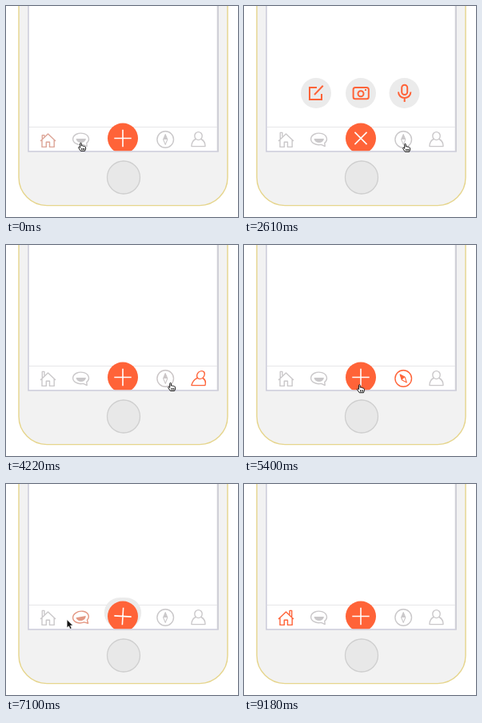
An HTML page for the animation above (9.89 s loop, 290 px wide and 264 px high).

```html
<!DOCTYPE html>
<html lang="en">
<head>
<meta charset="utf-8">
<title>Tab bar</title>
<style>
  html, body { margin: 0; width: 100%; height: 100%; overflow: hidden; background: #fff; }
  svg { display: block; width: 290px; height: 264px; }
  .icon { fill: none; stroke-width: 1.4; stroke-linejoin: round; }
  .menu .disc { fill: #ebebeb; }
  .menu .art { fill: none; stroke: #ff6338; stroke-width: 2; }
  .solid { stroke: none; fill: currentColor; }
</style>
</head>
<body>
<svg viewBox="0 0 290 264">
  <defs>
    <clipPath id="screen"><rect x="28" y="0" width="237" height="181.3"/></clipPath>
  </defs>

  <rect x="16" y="-60" width="261" height="309.6" rx="35" fill="#f2f2f2" stroke="#e6d58c" stroke-width="1.4"/>
  <rect x="28" y="-10" width="237" height="192" fill="#fff" stroke="#cbcbda" stroke-width="1.5"/>
  <path d="M264.7 0V182" stroke="#cfcfd6" stroke-width="2"/>
  <path d="M29 151.5H264" stroke="#e6e6e9"/>
  <circle cx="147" cy="214.5" r="20.5" fill="#e8e8e8" stroke="#cfcfcf" stroke-width="1.3"/>

  <g id="home" class="icon">
    <path d="M43 168.9L52.5 160L62 168.9M45 167.5V176.4H50.3V170.3H54.5V176.4H60.2V167.5"/>
    <path id="chimney"/>
  </g>
  <g id="chat" class="icon">
    <path d="M96.5 173.4A9.9 7.3 0 1 1 100.8 171.4L101.2 175.6Z"/>
    <path class="solid" d="M87.5 166H100C99.4 169.2 97 171 93.8 171S88.1 169.2 87.5 166Z"/>
  </g>
  <g id="compass" class="icon">
    <circle cx="199.2" cy="167" r="10.3"/>
    <g id="needle">
      <path stroke-width="1.1" d="M199.2 160.6L201.8 167L199.2 173.4L196.6 167Z"/>
      <path class="solid" d="M199.2 160.6L201.8 167H196.6Z"/>
    </g>
  </g>
  <g id="person" class="icon">
    <ellipse cx="240.5" cy="162.6" rx="4.7" ry="5"/>
    <path d="M237.2 166.5C233.7 168.1 231.9 171 231.9 175.6H249C249 171 247.2 168.1 243.8 166.5"/>
  </g>

  <g clip-path="url(#screen)">
    <g class="menu">
      <circle class="disc" cx="90" cy="109" r="19"/>
      <path class="art" d="M91 102H82V117H97V110"/>
      <path class="art" stroke-width="2.6" d="M88 111L98.7 99.8"/>
    </g>
    <g class="menu">
      <circle class="disc" cx="200.5" cy="109" r="19"/>
      <path class="art" d="M193 107.5C193 117.5 208.4 117.5 208.4 107.5M200.7 115V120"/>
      <rect class="art" x="197.2" y="98.7" width="7" height="12.4" rx="3.5"/>
    </g>
    <g class="menu">
      <circle class="disc" cx="146" cy="109" r="19"/>
      <rect class="art" x="136.6" y="101.9" width="19.2" height="14.4" rx="2.5"/>
      <circle class="art" cx="146" cy="109.7" r="3.5"/>
      <path class="art" d="M151 105H153"/>
    </g>
    <circle cx="146" cy="165.5" r="19" fill="#ff6338"/>
    <path id="plus" d="M135.3 165.5H156.7M146 154.8V176.2" stroke="#fff" stroke-width="1.6"/>
  </g>

  <g id="arrow">
    <path d="M0 0V10L2.3 8L4 11.6L5.8 10.8L4.2 7.3H7.3Z" fill="#111" stroke="#fff" stroke-width=".5"/>
  </g>
  <g id="hand">
    <path transform="scale(.82)" fill="#fff" stroke="#111" stroke-width="1.2" stroke-linejoin="round"
      d="M-1 .7C-1 -.5 1 -.5 1 .7V4.2C2 3.4 3 3.8 3.2 4.7C4.3 4.1 5.2 4.6 5.4 5.4C6.6 5 7.4 5.7 7.4 6.8V9L6.2 12H-.2L-3.4 7.4C-4 6.3 -2.9 5.5 -2 6.2L-1 7.2ZM1.4 8V10.5M3.3 8V10.5M5.2 8V10.5"/>
  </g>
</svg>
<script>
const LOOP = 9890, GONE = 9180;
const FADE = 600, SLIDE = 350, PAUSE = 100, GLIDE = 650;
const GREY = [202, 200, 202], ORANGE = [255, 99, 56];
const TABS = ['home', 'chat', 'compass', 'person'];

// where the pointer rests for each thing it visits
const spots = {
  home: { x: 59, y: 168 }, chat: { x: 93.5, y: 171.5 }, plus: { x: 142, y: 175 },
  compass: { x: 202, y: 172.5 }, person: { x: 240, y: 174 },
  corner: { x: 188, y: 228 }, outside: { x: 228, y: 288 }
};

// every tap selects one tab and clears the rest; plus opens the menu
const taps = [
  { at: -360, spot: 'none' }, { at: 50, spot: 'chat' }, { at: 830, spot: 'chat' },
  { at: 1920, spot: 'plus' }, { at: 2850, spot: 'compass' }, { at: 3670, spot: 'person' },
  { at: 4780, spot: 'compass' }, { at: 5830, spot: 'plus' }, { at: 6810, spot: 'chat' },
  { at: 7920, spot: 'home' }
];
const stops = [...taps.slice(1), { at: 8830, spot: 'corner' }, { at: LOOP, spot: 'outside' }];

const $ = id => document.getElementById(id);
const menus = [...document.querySelectorAll('.menu')];
const clamp = v => Math.min(1, Math.max(0, v));
const smooth = v => v * v * (3 - 2 * v);
const slowDown = v => 1 - (1 - v) ** 2;
const mix = (a, b, k) => a + (b - a) * k;

function level(t, spot, span, start = 0) {
  return taps.reduce((value, tap) =>
    mix(value, tap.spot === spot ? 1 : 0, smooth(clamp((t - tap.at) / span))), start);
}

function pointer(t) {
  const i = Math.max(0, stops.findLastIndex(s => t >= s.at + PAUSE));
  const from = spots[stops[i].spot], to = spots[stops[i + 1].spot];
  const k = slowDown(clamp((t - stops[i].at - PAUSE) / GLIDE));
  return [mix(from.x, to.x, k), mix(from.y, to.y, k)];
}

function isOverIcon(x, y) {
  const near = (cx, r) => Math.hypot(x - cx, y - 167) < r;
  return near(146, 19) || [52.5, 94, 199.2, 240.5].some(cx => near(cx, 12));
}

function drawCursor(t) {
  const [x, y] = pointer(t);
  const shown = t >= GONE ? '' : isOverIcon(x, y) ? 'hand' : 'arrow';
  for (const id of ['arrow', 'hand']) {
    $(id).style.display = id === shown ? '' : 'none';
    $(id).setAttribute('transform', `translate(${x} ${y})`);
  }
}

function drawTabs(t) {
  const on = {};
  for (const id of TABS) {
    const k = on[id] = level(t, id, FADE, id === 'home' ? 1 : 0);
    $(id).style.stroke = $(id).style.color = `rgb(${GREY.map((c, i) => Math.round(mix(c, ORANGE[i], k)))})`;
  }
  // the chimney sinks behind one roof slope and rises from the other
  const side = on.home < 0.5 ? -1 : 1;
  const rise = 4.6 * Math.abs(2 * on.home - 1);
  $('chimney').setAttribute('d', rise < 1 ? '' :
    `M${52.5 + side * 4.6} 163.6V${163 - rise}H${52.5 + side * 7.2}V166.2`);
  $('chat').setAttribute('transform', `rotate(${-10 * Math.sin(Math.PI * on.chat)} 94 167)`);
  $('needle').setAttribute('transform', `rotate(${-40 * on.compass} 199.2 167)`);
  $('person').setAttribute('transform',
    `translate(0 175.6) skewX(${-13 * on.person}) translate(0 -175.6)`);
}

function drawMenu(t) {
  const k = level(t, 'plus', SLIDE);
  menus.forEach((el, i) => {
    const dx = [56, -54.5, 0][i];
    el.style.display = k > 0.001 ? '' : 'none';
    el.setAttribute('transform', `translate(${dx * (1 - k)} ${56.5 * (1 - k)})`);
  });
  $('plus').setAttribute('transform', `rotate(${45 * k} 146 165.5)`);
}

function frame() {
  const t = performance.now() % LOOP;
  drawTabs(t);
  drawMenu(t);
  drawCursor(t);
  requestAnimationFrame(frame);
}
frame();
</script>
</body>
</html>
```
